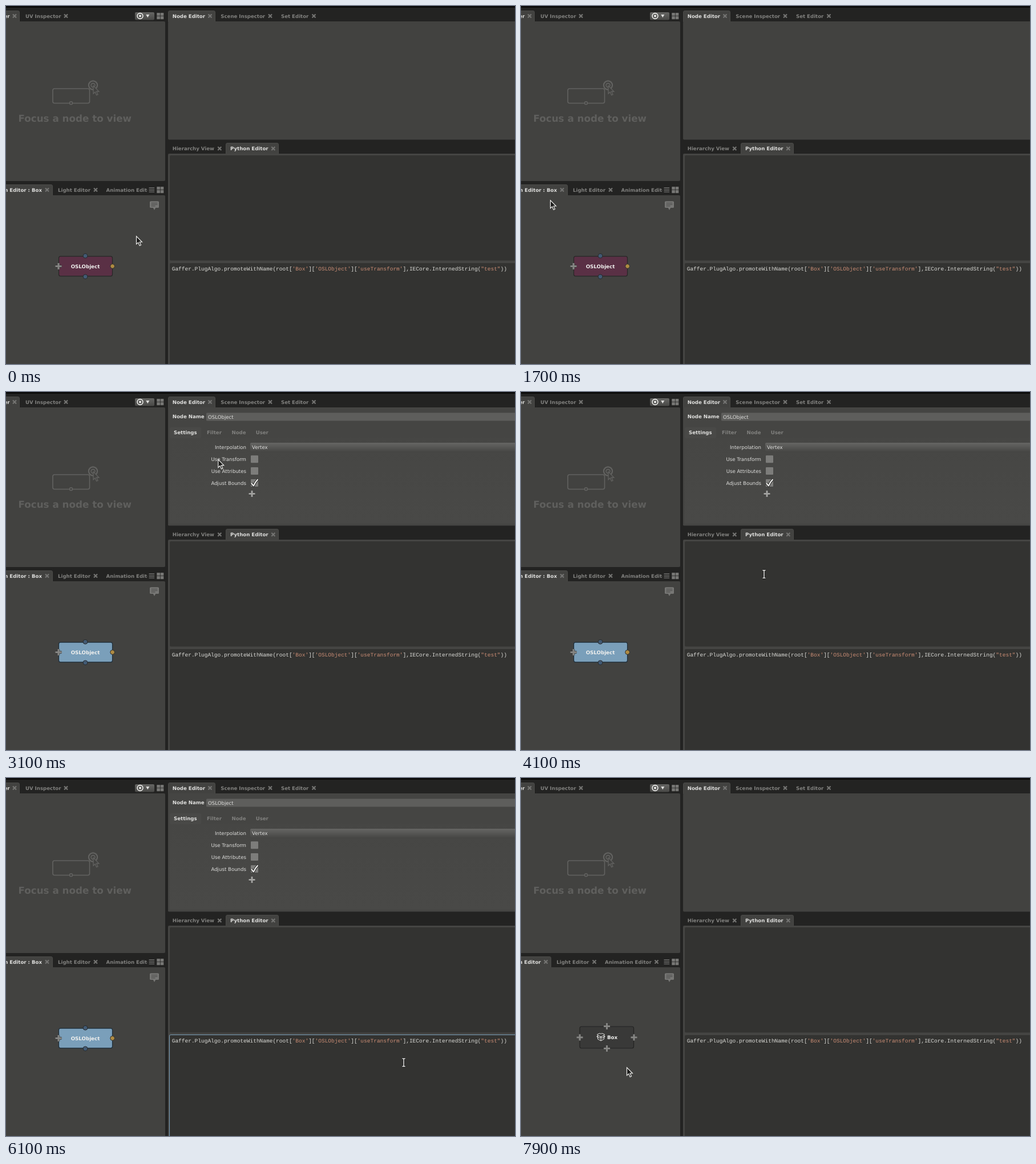
An HTML page for the animation above (8 s loop, 892x628 px).

```html
<!DOCTYPE html>
<html lang="en">
<head>
<meta charset="utf-8">
<title>Node promotion</title>
<style>
html, body { margin: 0; width: 100%; height: 100%; overflow: hidden; background: #232322; }
svg { display: block; width: 892px; height: 628px; }
text { font: 8.6px "DejaVu Sans", sans-serif; fill: #dededc; text-rendering: geometricPrecision; }
.b { font-weight: bold; }
.dim { fill: #80807e; }
.end { text-anchor: end; }
.mid { text-anchor: middle; }
.hint { font-size: 16.75px; fill: #5f5f5d; }
.node { font-size: 8.7px; fill: #f0f0ee; }
.code text { font: 9.5px "Liberation Mono", monospace; fill: #dadad6; }
.code .str { fill: #c98c74; }
.code .picked text, .code .picked .str { fill: #f0f2f4; }
</style>
</head>
<body>
<svg id="stage" viewBox="0 0 892 628" xmlns="http://www.w3.org/2000/svg"></svg>
<script>
const stage = document.getElementById('stage');
const PANEL = '#424240', BAR = '#232322', FIELD = '#333331', FRAME = '#454543', GREY = '#777775', BLUE = '#7a9fba';
const CODE_X = 291, CHAR = 5.7, SEL_START = 32;

const rect = (x, y, w, h, fill, extra = '') =>
  `<rect x="${x}" y="${y}" width="${w}" height="${h}" fill="${fill}" ${extra}/>`;
const text = (x, y, str, cls = '') => `<text x="${x}" y="${y}" class="${cls}">${str}</text>`;
const group = (id, body) => `<g id="${id}">${body}</g>`;
const line = (d, color, width) =>
  `<path d="${d}" fill="none" stroke="${color}" stroke-width="${width}" stroke-linejoin="round"/>`;
const outlined = (d, edge, edgeWidth, color, width) => line(d, edge, edgeWidth) + line(d, color, width);

const cross = (x, y) => line(`M${x - 3} ${y - 3}l6 6m0-6l-6 6`, '#747472', 2.2);
const plus = (x, y, color = '#858583') =>
  outlined(`M${x - 5.5} ${y}h11M${x} ${y - 5.5}v11`, '#343433', 4.4, color, 3.2);
const port = (x, y, fill) =>
  `<circle cx="${x}" cy="${y}" r="3.9" fill="${fill}" stroke="#272a2c"/>`;
const nodeBody = (x, y, w, h, fill, edge) =>
  rect(x, y, w, h, fill, `rx="3" stroke="${edge}" stroke-width="1.2"`);
const tabShape = (x, y, w) => {
  const d = `M${x + .5} ${y + 20}v-17q0-2.5 2.5-2.5h${w - 6}q2.5 0 2.5 2.5v17`;
  return `<path d="${d}" fill="${PANEL}" stroke="#4b4b49"/>`;
};
const label = (x, y, str, closeX, cls = 'b dim') => text(x, y, str, cls) + cross(closeX, y - 3);

const gridIcon = (x, y) => [0, 1, 2, 3].map(i =>
  rect(x + i % 2 * 6.4, y + (i >> 1) * 6, 5.6, 5.2, GREY)).join('');

const leftTop = () =>
  tabShape(-20, 8, 44) + label(6.6, 20.5, 'Viewer', 15, 'b end') + label(34, 20.5, 'UV Inspector', 105) +
  rect(-4, 27, 283, 280, PANEL, 'rx="2"') +
  rect(226, 11, 34, 13.5, 'url(#button)', 'rx="2"') +
  `<circle cx="235" cy="17.5" r="4.9" fill="none" stroke="#eeeeec" stroke-width="1.6"/>
   <circle cx="235" cy="17.5" r="2" fill="#eeeeec"/><path d="M245.3 15h6l-3 5.2z" fill="#dededc"/>` +
  gridIcon(264.3, 12) +
  `<g fill="none" stroke="#626260" stroke-width="1.6">
   <rect x="82" y="145" width="64.5" height="25.5" rx="3"/>
   <circle cx="114" cy="170.3" r="2.5" fill="${PANEL}"/>
   <circle cx="152.5" cy="139" r="7.6" stroke-width="2.2"/><circle cx="152.5" cy="139" r="3.4"/>
   <use href="#pointer" x="152.5" y="139" fill="${PANEL}" stroke-width="1.3"/></g>` +
  text(21.5, 202.5, 'Focus a node to view', 'b hint');

const leftBottom = () =>
  group('inBox', tabShape(-20, 313, 102) + label(63, 325.5, 'Graph Editor : Box', 72, 'b end') +
    label(91, 325.5, 'Light Editor', 157) +
    `<g clip-path="url(#tabClip)">${text(175.5, 325.5, 'Animation Editor', 'b dim')}</g>`) +
  group('outBox', tabShape(-20, 313, 73) + label(34.8, 325.5, 'Graph Editor', 43.5, 'b end') +
    label(62.3, 325.5, 'Light Editor', 128.5) + label(147, 325.5, 'Animation Editor', 237.5)) +
  line('M250.5 319.3h9.6m-9.6 3.4h9.6m-9.6 3.4h9.6', GREY, 1.4) +
  gridIcon(264.3, 317) +
  rect(-4, 332, 283, 300, PANEL, 'rx="2"') +
  rect(252, 342.5, 16, 11.5, GREY, 'rx="1.5"') + `<path d="M257.5 353.5h5l-2.5 4.5z" fill="${GREY}"/>` +
  line('M254.5 345.7h11m-11 2.6h11m-11 2.6h7', '#484846', 1);

const cube = line('M134.5 451.5l5.5 2.5 5.5-2.5v6.5l-5.5 3-5.5-3zM140 454v7', '#e4e4e2', 1) +
  line('M134.5 451.5l-1.8 2.3 5.3 2.5 2-2.3 2 2.3 5.2-2.5-1.7-2.3M134.5 451.5l-1-1.7 5-2 1.5 1.4 1.5-1.4 5 2-1 1.7', '#e4e4e2', 1);

const nodes = () =>
  group('oslNode',
    group('plain', nodeBody(92.5, 439.2, 94, 34.6, '#5a3045', '#272726')) +
    group('picked', nodeBody(92.5, 439.2, 94, 34.6, BLUE, '#1d2e3b')) +
    port(139, 438.3, '#425a74') + port(139, 474.8, '#425a74') + port(186.6, 456.5, '#b08b42') +
    plus(92, 456.5) + text(139, 459.6, 'OSLObject', 'b node mid')) +
  group('boxNode', nodeBody(103, 436, 94.5, 38, '#393938', '#232322') +
    plus(150.5, 435.5) + plus(150.5, 474.5) + plus(103, 455) + plus(198, 455) +
    cube + text(151, 458, 'Box', 'b node'));

const checkRow = (name, i) => {
  const y = 111.2 + i * 20.9;
  return text(421, y + 10, name, 'end') + rect(429, y, 13, 13, '#7d7d7b', 'rx="1"');
};

const settings = () =>
  rect(284, 27, 608, 207, FRAME) + rect(287, 80, 605, 151, 'url(#page)') +
  text(291.7, 46, 'Node Name', 'b') + rect(351, 36.5, 545, 14, '#5e5e5c', 'rx="1.5"') + text(354, 46.5, 'OSLObject') +
  rect(287, 62, 55, 19, '#494947', 'rx="2"') + text(294, 73.7, 'Settings', 'b') +
  text(352, 73.7, 'Filter', 'b dim') + text(395.5, 73.7, 'Node', 'b dim') + text(437.7, 73.7, 'User', 'b dim') +
  text(421, 99.7, 'Interpolation', 'end') + rect(428, 89, 470, 15, 'url(#button)', 'rx="2"') + text(431, 99.7, 'Vertex') +
  ['Use Transform', 'Use Attributes', 'Adjust Bounds'].map(checkRow).join('') +
  outlined('M430 160l3.8 4.6q2.6-6.3 7.5-11.3', '#2b2b2a', 4.2, '#f6f6f4', 2) +
  plus(431, 178.5, '#a0a09e');

const quote = s => `<tspan class="str">${s}</tspan>`;
const codeLine = text(CODE_X - .3, 463.7,
  `Gaffer.PlugAlgo.promoteWithName(root[${quote("'Box'")}][${quote("'OSLObject'")}]` +
  `[${quote("'useTransform'")}],IECore.InternedString(${quote('"test"')}))`);

const right = () =>
  tabShape(284, 8, 83) + label(291.7, 20.5, 'Node Editor', 357.5, 'b') +
  label(376.3, 20.5, 'Scene Inspector', 463) + label(482, 20.5, 'Set Editor', 539.5) +
  rect(284, 27, 612, 207.5, PANEL, 'rx="2"') + group('settings', settings()) +
  tabShape(385, 240, 93) + label(291.7, 253, 'Hierarchy View', 374.3) +
  label(393, 253, 'Python Editor', 468.3, 'b') +
  rect(284, 259, 612, 380, FRAME, 'rx="2"') +
  rect(287, 262, 610, 184.5, FIELD, 'rx="2"') + rect(287, 451, 610, 190, FIELD, 'rx="2"') +
  group('focus', rect(286.5, 450.5, 620, 190, 'none', `rx="2" stroke="${BLUE}"`)) +
  `<g class="code">${codeLine}<g class="picked" clip-path="url(#selClip)">` +
  rect(286, 454.5, 606, 12.5, BLUE) + codeLine + '</g></g>';

const ibeam = 'M-2.5-6.8h1.5q1 0 1 1v11.6q0 1-1 1h-1.5M2.5-6.8h-1.5q-1 0-1 1v11.6q0 1 1 1h1.5';

stage.innerHTML = `<defs>
  <linearGradient id="button" x2="0" y2="1"><stop stop-color="#666664"/><stop offset="1" stop-color="#484846"/></linearGradient>
  <linearGradient id="page" x2="0" y2="1"><stop stop-color="#464644"/><stop offset="1" stop-color="#494947"/></linearGradient>
  <clipPath id="tabClip"><rect x="170" y="313" width="77.5" height="19"/></clipPath>
  <clipPath id="selClip"><rect id="sel" x="${CODE_X + SEL_START * CHAR}" y="454" height="13"/></clipPath>
  <path id="pointer" d="M.5.8v14l3.2-2.9 2.5 5.5 2.3-1.1-2.4-5.3h4.3z"/></defs>` +
  rect(0, 0, 892, 628, BAR) + rect(0, 0, 892, 3, '#0b0b0b') +
  leftTop() + leftBottom() + nodes() + right() +
  group('arrow', '<use href="#pointer" fill="#1b1b1a" stroke="#f2f2f0" stroke-width="1.15"/>') +
  group('beam', outlined(ibeam, '#161616', 3, '#f4f4f2', 1.4));

// Pointer moves: start, end, x, y, ease-out power
const moves = [
  [300, 400, 209, 400, 1],
  [500, 900, 40, 340, 1],
  [1000, 1700, 51, 340, 1],
  [1700, 2100, 139, 450, 1.8],
  [2300, 2800, 350, 118, 1.4],
  [2900, 3500, 414, 117, 1],
  [3500, 3700, 358, 121, 1],
  [3700, 4600, 474, 460, 1.5],
  [4600, 5500, 694, 462, 2.5],
  [5500, 5600, 700, 464, 1],
  [5900, 6100, 697, 499, 1],
  [6400, 7100, 185, 507, 1.5]
];
const progress = (t, a, b) => Math.min(1, Math.max(0, (t - a) / (b - a)));

function pointerAt(t) {
  let x = 228, y = 403;
  for (const [from, to, toX, toY, power] of moves) {
    const f = 1 - (1 - progress(t, from, to)) ** power;
    x += (toX - x) * f;
    y += (toY - y) * f;
  }
  // circle once around the tab title
  const turn = progress(t, 1000, 1700) * 2 * Math.PI;
  return [x + 17 * Math.sin(turn), y - 14 * (1 - Math.cos(turn))];
}

const parts = Object.fromEntries([...stage.querySelectorAll('[id]')].map(e => [e.id, e]));
const show = (id, on) => parts[id].setAttribute('display', on ? 'inline' : 'none');
const within = (t, a, b) => t >= a && t < b;

function draw(ms) {
  const t = Math.floor(ms % 8000 / 100) * 100;
  const [x, y] = pointerAt(t);
  const picked = within(t, 2100, 7100), inBox = t < 7900;
  const overText = x > 286 && y > 262;

  show('inBox', inBox);
  show('outBox', !inBox);
  show('oslNode', inBox);
  show('boxNode', !inBox);
  show('plain', !picked);
  show('picked', picked);
  show('settings', within(t, 2300, 7200));
  show('focus', within(t, 4600, 7100));

  const column = Math.round((x - 3 - CODE_X) / CHAR);
  const count = within(t, 4600, 6100) ? Math.max(0, column - SEL_START) : 0;
  parts.sel.setAttribute('width', count * CHAR);

  show('arrow', !overText);
  show('beam', overText);
  parts[overText ? 'beam' : 'arrow'].setAttribute('transform', `translate(${x} ${y})`);
}

const start = performance.now();
function tick() {
  draw(performance.now() - start);
  requestAnimationFrame(tick);
}
draw(0);
requestAnimationFrame(tick);
</script>
</body>
</html>
```
